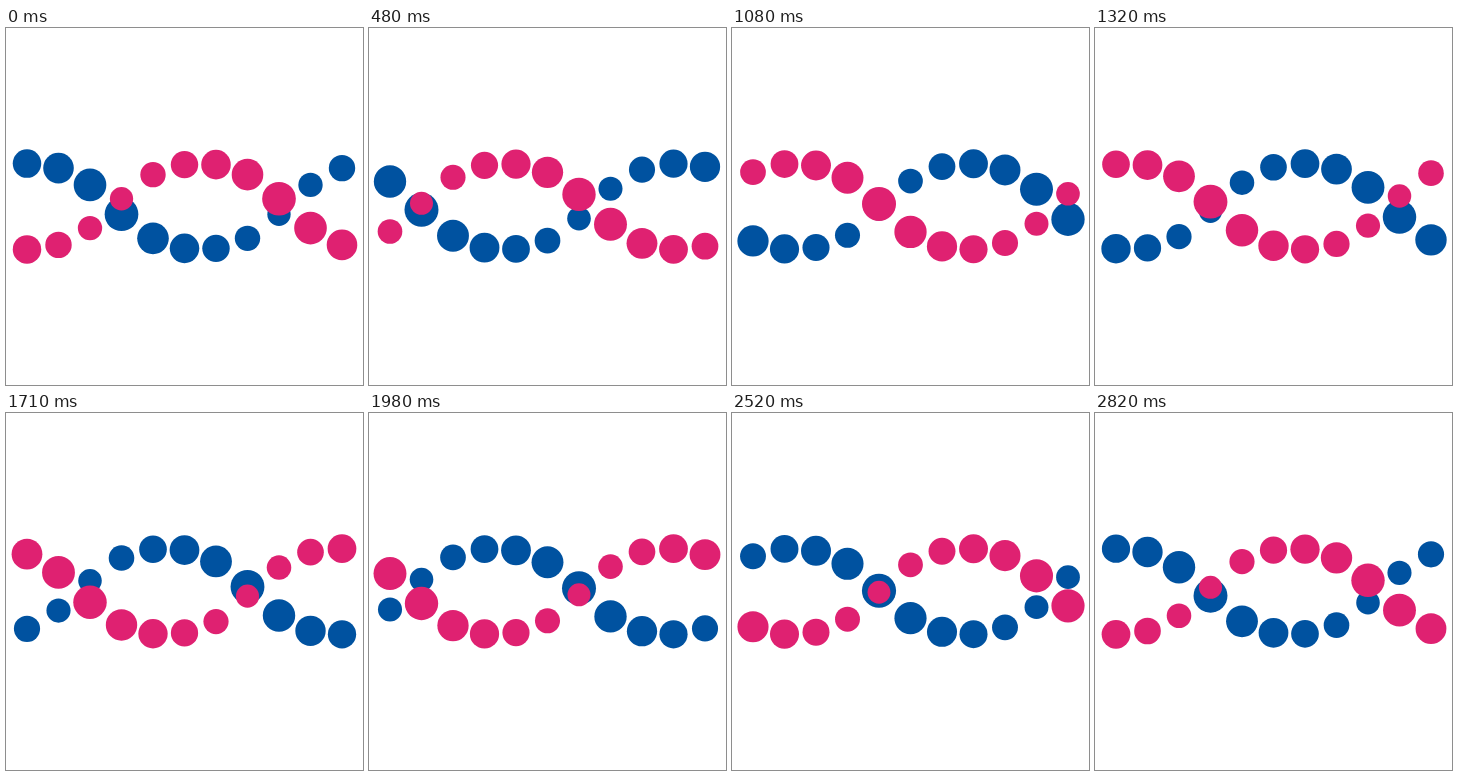
Write an HTML page that moves like this. It is 357x357 px and loops after 2850 ms.

```html
<!DOCTYPE html>
<html lang="en">
<head>
<meta charset="utf-8">
<title>Double helix</title>
<style>
  html, body { margin: 0; width: 100%; height: 100%; overflow: hidden; background: #fff; }
  svg { display: block; width: 100%; height: 100%; }
</style>
</head>
<body>
<svg id="stage" viewBox="0 0 357 357"></svg>
<script>
const LOOP = 2850, STEP = 30;
const COLUMNS = 11, LEFT = 21, GAP = 31.5;
const MIDDLE = 178.5, SWING = 42.9;
const RADIUS = 14.25, GROWTH = 0.2;
const STRANDS = [
  { color: '#0052a0', offset: 0 },
  { color: '#df2171', offset: 0.5 }
];

const stage = document.getElementById('stage');
const dots = [];

for (const { color, offset } of STRANDS) {
  for (let i = 0; i < COLUMNS; i++) {
    const node = document.createElementNS('http://www.w3.org/2000/svg', 'circle');
    node.setAttribute('cx', LEFT + i * GAP);
    node.setAttribute('fill', color);
    stage.appendChild(node);
    dots.push({ node, phase: offset + i / COLUMNS });
  }
}

// cubic-bezier(.5, 0, .5, 1), solved by bisection
function ease(x) {
  let low = 0, high = 1;
  for (let k = 0; k < 24; k++) {
    const u = (low + high) / 2;
    if (1.5 * u * (1 - u) + u ** 3 < x) low = u;
    else high = u;
  }
  return low * low * (3 - 2 * low);
}

// Rises from 0 to 1 and falls back over one cycle
function triangle(phase) {
  const p = phase - Math.floor(phase);
  return 1 - Math.abs(1 - 2 * p);
}

function draw(time) {
  const turn = time / LOOP;
  for (const { node, phase } of dots) {
    const p = phase + turn;
    const height = 2 * ease(triangle(p)) - 1;
    const depth = 2 * triangle(p + 0.25) - 1;
    node.setAttribute('cy', (MIDDLE + SWING * height).toFixed(3));
    node.setAttribute('r', (RADIUS * (1 + GROWTH * depth)).toFixed(3));
  }
}

const start = performance.now();

function tick() {
  const elapsed = Math.max(0, performance.now() - start) % LOOP;
  draw(Math.floor(elapsed / STEP) * STEP);
  requestAnimationFrame(tick);
}

tick();
</script>
</body>
</html>
```
